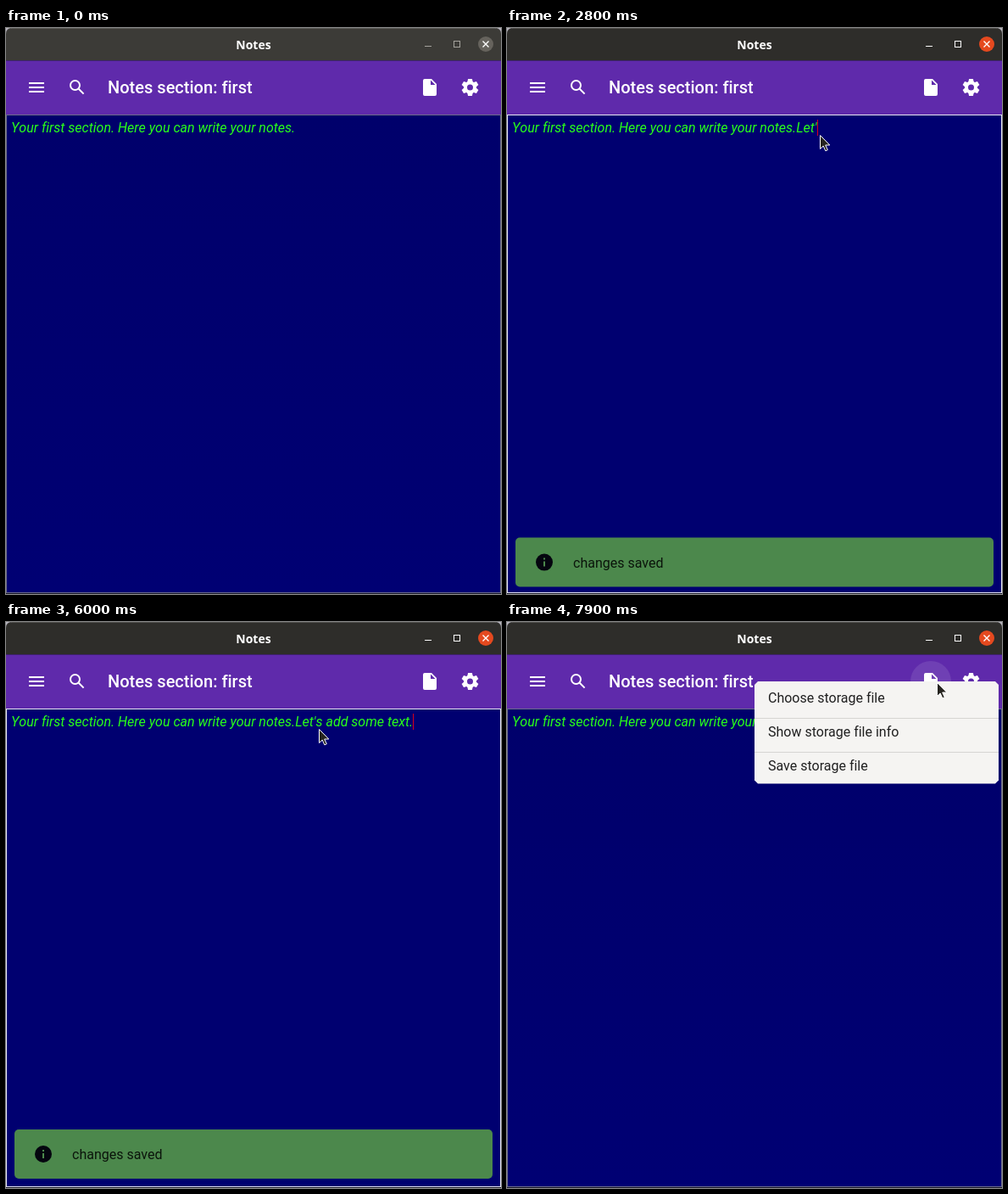
An HTML page that plays this animation: 584 px wide and 667 px high, repeating every 8 s.

```html
<!DOCTYPE html>
<html lang="en">
<head>
<meta charset="utf-8">
<title>Notes</title>
<style>
  html, body { margin: 0; width: 100%; height: 100%; overflow: hidden; background: #00006c; }
  svg { display: block; width: 584px; height: 667px; }
  text { font-family: Roboto, sans-serif; font-size: 16px; white-space: pre; font-variant-ligatures: none; }
  .caption { font: 700 14px "Open Sans", "Noto Sans", sans-serif; fill: #fff; }
  .heading { font-size: 20px; font-weight: 500; fill: #fff; }
  .note { font-style: italic; font-kerning: none; fill: #29ff1a; }
</style>
</head>
<body>
<svg viewBox="0 0 584 667">
  <linearGradient id="shade" x2="0" y2="1">
    <stop stop-color="#00006b"/>
    <stop offset="1" stop-color="#000073"/>
  </linearGradient>

  <rect width="584" height="40" fill="#b9b6c0"/>
  <path id="bar" d="M0 38V7Q0 0 7 0H577Q584 0 584 7V38Z"/>
  <path d="M6 .5H578" stroke="#fff" stroke-opacity=".16"/>
  <text class="caption" x="292" y="25" text-anchor="middle">Notes</text>
  <g id="controls" fill="none">
    <path d="M494 21.5H502"/>
    <rect x="528.5" y="15.5" width="7" height="7"/>
  </g>
  <circle id="close" cx="566" cy="19" r="9"/>
  <path d="M562.5 15.5l7 7m0-7l-7 7" stroke="#fff" stroke-width="1.4"/>

  <rect y="38" width="584" height="64" fill="#5f2aab"/>
  <rect y="38" width="584" height="1" fill="#3f2170"/>
  <circle id="ripple" cx="500" cy="70" fill="#fff" fill-opacity=".1"/>
  <g fill="#fff">
    <path d="M27 64h18v2H27zm0 5h18v2H27zm0 5h18v2H27z"/>
    <g fill="none" stroke="#fff" stroke-width="2">
      <circle cx="81.5" cy="67.5" r="5.5"/>
      <path d="M85.5 71.5L91.6 77.6"/>
    </g>
    <path d="M501 67V61.5L506.5 67M494 60A2 2 0 0 0 492 62V78A2 2 0 0 0 494 80H506A2 2 0 0 0 508 78V66L502 60Z"/>
    <g id="cog" transform="translate(547.5 70)">
      <circle r="5.5" fill="none" stroke="#fff" stroke-width="4"/>
    </g>
  </g>
  <text class="heading" x="120" y="77">Notes section: first</text>

  <rect y="102" width="584" height="565" fill="#14142a"/>
  <rect id="page" x=".5" y="102.5" width="583" height="563"/>
  <text id="note" class="note" x="6" y="123"></text>
  <rect id="caret" y="108" width="1" height="19" fill="#d80018"/>

  <g id="snack">
    <rect x="10" width="564" height="58" rx="5" fill="#4c884c"/>
    <circle cx="44" cy="29" r="10" fill="#05050f"/>
    <path d="M43 24h2v2h-2zm0 4h2v6h-2z" fill="#4c884c"/>
    <text x="78" y="35" fill="#0b140b">changes saved</text>
  </g>

  <clipPath id="opening"><rect id="reveal"/></clipPath>
  <g id="menu" clip-path="url(#opening)">
    <path d="M296 70H576L580 74V186.5L576 190.5H296L292 186.5V74Z" fill="#f5f4f2"/>
    <path d="M292 113.5H580M292 153.5H580" stroke="#d6d5d2"/>
    <g id="items" fill="#202020"></g>
  </g>

  <path id="pointer" d="M.5 .5V16.5L4.2 13L6.8 18.8L9.3 17.7L6.7 12H11.8Z"
        fill="#26241f" stroke="#fff" stroke-linejoin="round"/>
</svg>
<script>
const LOOP = 8000;
const STEP = 100;
const BASE = "Your first section. Here you can write your notes.";
const ADDED = "Let's add some text.";

const $ = id => document.getElementById(id);
const mix = (a, b, k) => a + (b - a) * k;
const ramp = (t, from, to) => Math.min(1, Math.max(0, (t - from) / (to - from)));
const easeOut = k => 1 - (1 - k) ** 3;

// Slow start, a fast burst in the middle, hesitant end
function typedCount(t) {
  const count = 6 * ramp(t, 1900, 3100) + 2 * ramp(t, 3100, 3700) +
    9 * ramp(t, 3700, 4600) + 2 * ramp(t, 4600, 5300) + ramp(t, 5300, 6000);
  return Math.floor(count + 1e-6);
}

// In from the corner, up to the toolbar, then onto the file button
function pointerAt(t) {
  const enter = ramp(t, 600, 900), rise = ramp(t, 6300, 6600);
  const drift = ramp(t, 6600, 6800) + ramp(t, 7100, 7400);
  return [
    562 - 193 * enter + 103 * rise + 17.5 * drift,
    14 + 112 * enter - 63 * rise + 4 * drift
  ].map(Math.round);
}

function set(id, attrs) {
  for (const [name, value] of Object.entries(attrs)) $(id).setAttribute(name, value);
}

function add(parent, tag, attrs, text = "") {
  const el = document.createElementNS("http://www.w3.org/2000/svg", tag);
  for (const [name, value] of Object.entries(attrs)) el.setAttribute(name, value);
  el.textContent = text;
  $(parent).append(el);
}

const show = on => on ? "visible" : "hidden";

for (let i = 0; i < 6; i++) {
  add("cog", "path", { d: "M-3.3 -6L-2.4 -10H2.4L3.3 -6Z", transform: `rotate(${i * 60})` });
}
["Choose storage file", "Show storage file info", "Save storage file"].forEach((label, i) =>
  add("items", "text", { x: 308, y: 95 + i * 40 }, label));

function draw(t) {
  const active = t >= 1100;
  const focused = active && t < 7500;

  set("bar", { fill: active ? "#2e2d2a" : "#3c3b37" });
  set("controls", { stroke: active ? "#fff" : "#a5a39d" });
  set("close", { fill: active ? "#e5491f" : "#66635d" });
  set("page", {
    fill: focused ? "#000070" : "url(#shade)",
    stroke: focused ? "#e8e8f2" : "#6c6c88"
  });

  const line = BASE + ADDED.slice(0, typedCount(t));
  if ($("note").textContent !== line) $("note").textContent = line;
  set("caret", {
    x: Math.round(6 + $("note").getComputedTextLength()),
    visibility: show(focused && t >= 1600)
  });

  const raised = easeOut(ramp(t, 2600, 2900)) - easeOut(ramp(t, 6300, 6600));
  set("snack", { transform: `translate(0 ${mix(667, 598, raised)})` });

  const open = easeOut(ramp(t, 7600, 7900));
  const left = mix(500, 292, open);
  set("ripple", { r: 24 * open });
  set("reveal", { x: left, y: 70, width: mix(500, 580, open) - left, height: 121 * open });
  set("menu", { opacity: open });

  const [x, y] = pointerAt(t);
  set("pointer", { transform: `translate(${x} ${y})`, visibility: show(t >= 600) });
}

const start = performance.now();
function tick() {
  const t = (performance.now() - start) % LOOP;
  draw(Math.floor(t / STEP) * STEP);
  requestAnimationFrame(tick);
}
tick();
</script>
</body>
</html>
```
